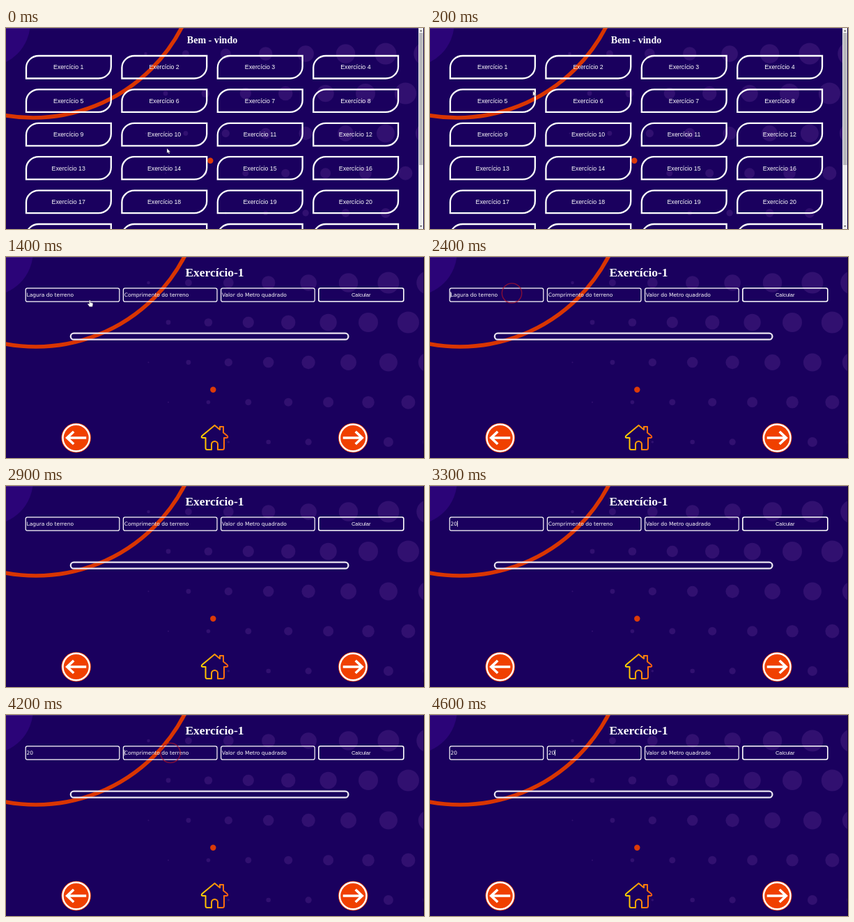
Animation, 600 px wide and 289 px high, one loop 5 s. Source, as an HTML page:

```html
<!DOCTYPE html>
<html lang="pt">
<head>
<meta charset="utf-8">
<title>Exercícios</title>
<style>
  html, body { margin: 0; width: 100%; height: 100%; overflow: hidden; background: #1a005e; }
  svg { display: block; width: 100%; height: 100%; }
  text { fill: #fff; }
  .sans { font-family: "Liberation Sans", Arial, sans-serif; }
  .serif { font-family: "Liberation Serif", "Times New Roman", serif; font-weight: bold; }
  .field { font: 7.5px "DejaVu Sans", Verdana, sans-serif; }
  .mid { text-anchor: middle; }
  .box { fill: none; stroke: #fff; }
</style>
</head>
<body>
<svg viewBox="0 0 600 289">
  <defs>
    <linearGradient id="gold" gradientUnits="userSpaceOnUse" x1="280" y1="0" x2="319" y2="0">
      <stop offset="0" stop-color="#ffd800"/>
      <stop offset="1" stop-color="#ff5a10"/>
    </linearGradient>
    <g id="arrowButton">
      <circle r="21.3" fill="#e63a08"/>
      <circle r="19.2" fill="#f04000" stroke="#fff" stroke-width="2.4"/>
      <path d="M14.5 0H-12M-3.5-9L-13 0L-3.5 9" fill="none" stroke="#fff" stroke-width="3.6"/>
    </g>
  </defs>

  <rect width="600" height="289" fill="#1a005e"/>
  <g id="backdrop">
    <circle cx="-25" cy="-8" r="64" fill="#2b0478"/>
    <g id="dots" fill="#311070"/>
    <circle cx="43" cy="-111" r="240" fill="none" stroke="#d93500" stroke-width="5.6"/>
    <circle cx="297.3" cy="190.7" r="4.2" fill="#dc3a08"/>
  </g>

  <g id="menu">
    <text class="serif mid" x="296" y="22" font-size="14">Bem - vindo</text>
    <g id="buttons"></g>
    <rect x="592" width="7" height="289" fill="#eee"/>
    <rect x="593" y="7" width="5.5" height="190" fill="#b9b9bd"/>
    <path d="M594 5l1.7-2.2L597.4 5zM594 284l1.7 2.2 1.7-2.2z" fill="#555"/>
  </g>

  <g id="exercise">
    <text class="serif mid" x="299.5" y="28" font-size="17.5">Exercício-1</text>
    <g id="fields"></g>
    <rect class="box" x="448.8" y="44.8" width="122" height="19.2" rx="2.5" stroke-width="1.6"/>
    <text class="sans mid" x="509.7" y="56.5" font-size="7.5">Calcular</text>
    <rect class="box" x="92.8" y="109.7" width="398.6" height="9" rx="4.5" stroke-width="2.3" style="stroke:#eae4f0"/>
    <use href="#arrowButton" x="100.7" y="260"/>
    <use href="#arrowButton" transform="translate(498.2 260) scale(-1 1)"/>
    <path d="M299.5 242L307 248.3V244H312V252.5L317.5 257Q319.5 260 316 260H313V274.5Q313 277 310.5 277H304V269.5A4.5 4.5 0 0 0 295 269.5V277H289Q286.500 277 286.500 274.5V260H283Q279.500 260 281.500 257Z"
      fill="none" stroke="url(#gold)" stroke-width="2" stroke-linejoin="round"/>
    <rect id="caret" y="50" width=".8" height="8.500" fill="#fff"/>
  </g>

  <rect width="600" height=".8" fill="#fff" opacity=".22"/>
  <rect x="599" width="1" height="289" fill="#10003c"/>
  <circle id="click" r="14.2" fill="none" stroke="#b01428" stroke-width="1.3"/>
  <path id="pointer" d="M0 0V7L1.7 5.6L2.8 8L4 7.5L3 5.200H5Z" fill="#fff" stroke="#222" stroke-width=".3"/>
  <path id="hand" d="M-1.500-4Q-.7-5 0-4V-1L3-.4Q4 0 3.800 1.500L3 5H-1.200L-4 1Q-3.600 0-1.500 1Z" fill="#fff" stroke="#222" stroke-width=".3"/>
</svg>
<script>
const el = id => document.getElementById(id);
const show = (id, on) => el(id).style.display = on ? "" : "none";
const place = (id, x, y) => el(id).setAttribute("transform", `translate(${x} ${y})`);
const range = n => [...Array(n).keys()];

// Each row: first x, y, first radius, seventh radius
const dotRows = [
  [204.5, 37, 2.3, 15.5], [233, 94, 3.4, 15.6], [204.5, 151.5, 1, 13],
  [233, 208.7, 1, 10], [204.5, 266, -1.5, 7]
];
el("dots").innerHTML = dotRows.map(([x, y, first, last]) => range(8).map(k => {
  const f = k / 6;
  const r = Math.max(0, first + (last - first) * f * (1.25 - .25 * f));
  return `<circle cx="${x + 57.4 * k}" cy="${y}" r="${r}"/>`;
}).join("")).join("");

el("buttons").innerHTML = range(24).map(i => {
  const x = 29 + i % 4 * 137.4, y = 40 + Math.floor(i / 4) * 48.4;
  return `<path class="box" stroke-width="2.3" d="M${x + 18} ${y}h103.800v15.500a18 17 0 0 1-18 17h-103.800v-15.500a18 17 0 0 1 18-17z"/>
    <text class="sans mid" font-size="8.75" x="${x + 60.7}" y="${y + 19.3}">Exercício ${i + 1}</text>`;
}).join("");

const fieldX = i => 28.2 + 140.2 * i;
const placeholders = ["Lagura do terreno", "Comprimento do terreno", "Valor do Metro quadrado"];
el("fields").innerHTML = placeholders.map((_, i) =>
  `<rect class="box" x="${fieldX(i)}" y="44.8" width="134.6" height="19.4" rx="2.5" stroke-width="1.2"/>
   <text class="field" id="field${i}" x="${fieldX(i) + 1.3}" y="57"></text>`).join("");

function draw(now) {
  const t = now % 5000;
  const between = (a, b) => t >= a && t < b;
  const onMenu = t < 1400;
  show("menu", onMenu);
  show("exercise", !onMenu);
  place("backdrop", onMenu ? -4 : 0, 0);

  const moved = t < 100 ? 0 : t < 200 ? .35 : .75;
  place("pointer", 231 - 111 * moved, 173 - 110 * moved);
  show("pointer", t < 300);
  place("hand", onMenu ? 120.5 : 121, 66.500);
  show("hand", between(300, 2000));

  const clicks = [[700, 1400, 119.5, 62.2], [2400, 2600, 117.5, 52], [4200, 4400, 236, 54.5]];
  const click = clicks.find(([a, b]) => between(a, b));
  show("click", click);
  if (click) {
    place("click", click[2], click[3]);
    el("click").style.opacity = onMenu ? .9 : t - click[0] < 100 ? .75 : .4;
  }

  const typed = [t < 3200 ? "" : t < 3300 ? "2" : "20", t < 4600 ? "" : "20", ""];
  typed.forEach((value, i) => el("field" + i).textContent = value || placeholders[i]);

  // The caret blinks every 500 ms, restarting on focus and on each key
  const active = t < 4200 ? 0 : 1;
  const restart = [4600, 4200, 3300, 3200, 2400].find(s => t >= s);
  show("caret", restart && Math.floor((t - restart) / 500) % 2 === 0);
  el("caret").setAttribute("x", fieldX(active) + 1.2 + typed[active].length * 4.8);
}

function frame() {
  draw(performance.now());
  requestAnimationFrame(frame);
}
frame();
</script>
</body>
</html>
```
